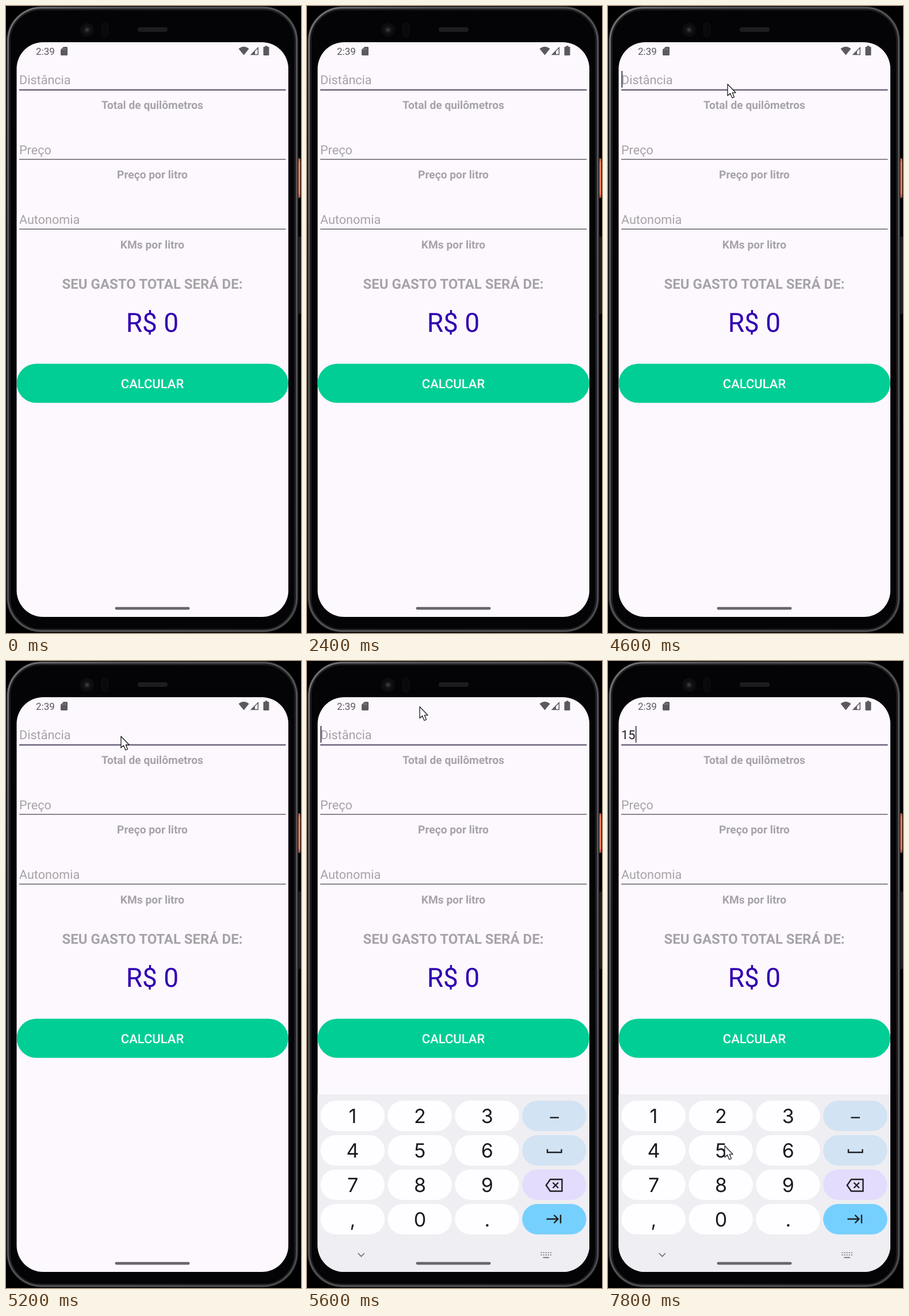
Animation, 513 px wide and 1091 px high, one loop 8000 ms. Source, as an HTML page:

```html
<!DOCTYPE html>
<html lang="pt-BR">
<head>
<meta charset="utf-8">
<title>Gasto de viagem</title>
<style>
html, body { margin: 0; width: 100%; height: 100%; overflow: hidden; background: #000; }
svg { display: block; width: 513px; height: 1091px; font-family: Roboto, sans-serif; text-rendering: geometricPrecision; }
.field { font-size: 21.6px; fill: #a6a2a7; }
.typed { fill: #1d1b20; }
.label { font-size: 19.2px; font-weight: 700; fill: #a6a3a8; text-anchor: middle; }
.caret { fill: #686273; }
.digit { font: 400 34px Inter, sans-serif; fill: #1b1b1f; text-anchor: middle; }
.icon { fill: none; stroke: #1f1f23; stroke-width: 2.4; }
.small { stroke: #68686c; stroke-width: 1.6; }

#hint, #one, #two, #pad, #mouse { animation: 8s step-end infinite; }
#hint { animation-name: hint; }
#one { animation-name: one; }
#two { animation-name: two; }
#pad { animation-name: rise; }
#mouse { animation-name: roam; }
#blink { animation: blink 1s step-end infinite; }

@keyframes blink { 0% { opacity: 0; } 60%, 100% { opacity: 1; } }
@keyframes hint { 0% { visibility: visible; } 90%, 100% { visibility: hidden; } }
@keyframes one { 0% { visibility: hidden; } 90% { visibility: visible; } 97.5%, 100% { visibility: hidden; } }
@keyframes two { 0% { visibility: hidden; } 97.5%, 100% { visibility: visible; } }
@keyframes rise {
  0% { transform: translateY(320px); }
  67.5% { transform: translateY(20px); }
  70%, 100% { transform: none; }
}
@keyframes roam {
  0% { visibility: hidden; transform: translate(220px, 80px); }
  55% { visibility: visible; transform: translate(220px, 80px); }
  57.5% { visibility: visible; transform: translate(208px, 136px); }
  65% { visibility: visible; transform: translate(200px, 131px); }
  67.5% { visibility: visible; transform: translate(173px, 115px); }
  70% { visibility: visible; transform: translate(196px, 79.5px); }
  77.5% { visibility: visible; transform: translate(196px, 79.5px); animation-timing-function: steps(3, end); }
  85% { visibility: visible; transform: translate(105px, 782px); }
  92.5% { visibility: visible; transform: translate(150px, 812px); }
  95%, 100% { visibility: visible; transform: translate(203px, 843.5px); }
}
</style>
</head>
<body>
<svg viewBox="0 0 513 1091">
  <defs>
    <clipPath id="screen"><rect x="18.5" y="63" width="472.5" height="1000" rx="46"/></clipPath>
    <linearGradient id="power" x2="0" y2="1">
      <stop offset="0" stop-color="#b55a40"/><stop offset=".12" stop-color="#f57f5c"/>
      <stop offset=".88" stop-color="#f57f5c"/><stop offset="1" stop-color="#a04c34"/>
    </linearGradient>
    <linearGradient id="rim" x2="1" y2="1">
      <stop offset="0" stop-color="#767678"/><stop offset=".2" stop-color="#58585b"/>
      <stop offset="1" stop-color="#4c4c4f"/>
    </linearGradient>
  </defs>

  <!-- phone body -->
  <rect width="513" height="1091"/>
  <rect x="506" y="401" width="7" height="135" rx="2" fill="#1d1d1f"/>
  <rect x="506" y="265" width="5.8" height="69" rx="1.5" fill="url(#power)"/>
  <rect x=".5" y=".5" width="508" height="1089.5" rx="61" fill="#1c1c1e"/>
  <rect x="3.500" y="3" width="502" height="1084.500" rx="58" fill="#161618" stroke="url(#rim)" stroke-width="3"/>
  <rect x="7" y="6.500" width="495" height="1078" rx="54" fill="#040306" stroke="#242427" stroke-width="1.400"/>
  <circle cx="141" cy="41.5" r="12" fill="#0d0d0f"/>
  <circle cx="141" cy="41.5" r="6.5" fill="#18181d"/>
  <circle cx="141" cy="41.5" r="3" fill="#36363e"/>
  <rect x="166.5" y="29" width="11" height="25" rx="5.5" fill="#09090a" stroke="#111113"/>
  <rect x="229" y="37" width="52" height="8" rx="4" fill="#1d1d1f"/>

  <g clip-path="url(#screen)">
    <rect x="18" y="62" width="474" height="1002" fill="#fdf7fe"/>

    <!-- status bar -->
    <g fill="#5c595e">
      <text x="52" y="84.5" font-size="17">2:39</text>
      <path d="M100 71h5.500q1.500 0 1.500 1.500v12q0 1.500-1.500 1.500h-9q-1.500 0-1.500-1.500v-8.500z"/>
      <path d="M413.500 85.500L404.500 74.500Q413.500 67 422.500 74.500z"/>
      <path d="M426.500 84.500L438.300 72.500V84.500z" fill="none" stroke="#5c595e" stroke-width="1.500"/>
      <path d="M426 85L433 78V85z"/>
      <path d="M450.500 71v-1.800h4v1.800h2q1 0 1 1v13q0 1-1 1h-8q-1 0-1-1v-13q0-1 1-1z"/>
    </g>
    <path d="M98.500 74v3M101 73v4M103.500 73v4" stroke="#8b888d" stroke-width="1"/>

    <!-- form -->
    <g id="hint">
      <text class="field" x="23" y="136">Distância</text>
      <rect id="blink" class="caret" x="23" y="113" width="2.500" height="29"/>
    </g>
    <g id="one">
      <text class="field typed" x="23" y="136">1</text>
      <rect class="caret" x="35.500" y="113" width="2.300" height="29"/>
    </g>
    <g id="two">
      <text class="field typed" x="23" y="136">15</text>
      <rect class="caret" x="47.500" y="113" width="2.300" height="29"/>
    </g>
    <text class="field" x="23" y="257.500">Preço</text>
    <text class="field" x="23" y="379">Autonomia</text>
    <path d="M23 146H486.500" stroke="#6b647d" stroke-width="2.500"/>
    <path d="M23 266.700H486.500M23 388.300H486.500" stroke="#66626a" stroke-width="1.500"/>
    <text class="label" x="254.500" y="179">Total de quilômetros</text>
    <text class="label" x="254.500" y="300.300">Preço por litro</text>
    <text class="label" x="254.500" y="421.800">KMs por litro</text>
    <text class="label" x="254.500" y="491.500" style="font-size:24px">SEU GASTO TOTAL SERÁ DE:</text>
    <text x="254.500" y="567" font-size="46" fill="#3000b0" text-anchor="middle">R$ 0</text>
    <rect x="18.500" y="622.500" width="472.500" height="68" rx="34" fill="#00ce95"/>
    <text x="254.500" y="665" font-size="22" font-weight="500" fill="#fff" text-anchor="middle">CALCULAR</text>

    <!-- number pad -->
    <g id="pad">
      <rect x="18" y="754" width="474" height="340" fill="#efeef2"/>
      <g id="keys"></g>
      <path class="icon" d="M422.500 794.500H438"/>
      <path class="icon" d="M418 849.500V855H442.500V849.500"/>
      <path class="icon" d="M423 902H443.500V922.500H423L415.800 912.200zM427.500 907.500L437 917M437 907.500L427.500 917"/>
      <path class="icon" d="M416.500 971H436M429.500 964L436.500 971L429.500 978M441 963.500V978.500"/>
      <path class="icon small" d="M88.800 1030.500L94.300 1036L99.800 1030.500"/>
      <path class="icon small" d="M406.500 1029.500H425M406.500 1033.500H425" stroke-dasharray="2 2.100"/>
      <path class="icon small" d="M410.500 1038H421"/>
    </g>
    <rect x="189.500" y="1045.800" width="130" height="4.600" rx="2.300" fill="#69666b"/>
  </g>

  <path id="mouse" d="M0 0V20L4.500 16L8 24L11.500 22.500L8.300 14.800H14z" fill="#fff" stroke="#1a1a1e" stroke-width="1.300" stroke-linejoin="round"/>
</svg>
<script>
const rows = ["123", "456", "789", ",0."];
const sideColors = ["#d2e3f3", "#d2e3f3", "#e4dcfd", "#76d0ff"];
const key = (col, row, fill, char = "") => {
  const x = 23.5 + col * 116.9, y = 765 + row * 59.9;
  return `<rect x="${x}" y="${y}" width="111.5" height="53" rx="26.5" fill="${fill}"/>` +
    `<text class="digit" x="${x + 56}" y="${y + 39}">${char}</text>`;
};
document.getElementById("keys").innerHTML = rows.map((chars, row) =>
  [...chars].map((char, col) => key(col, row, "#fefdff", char)).join("") + key(3, row, sideColors[row])
).join("");
</script>
</body>
</html>
```
